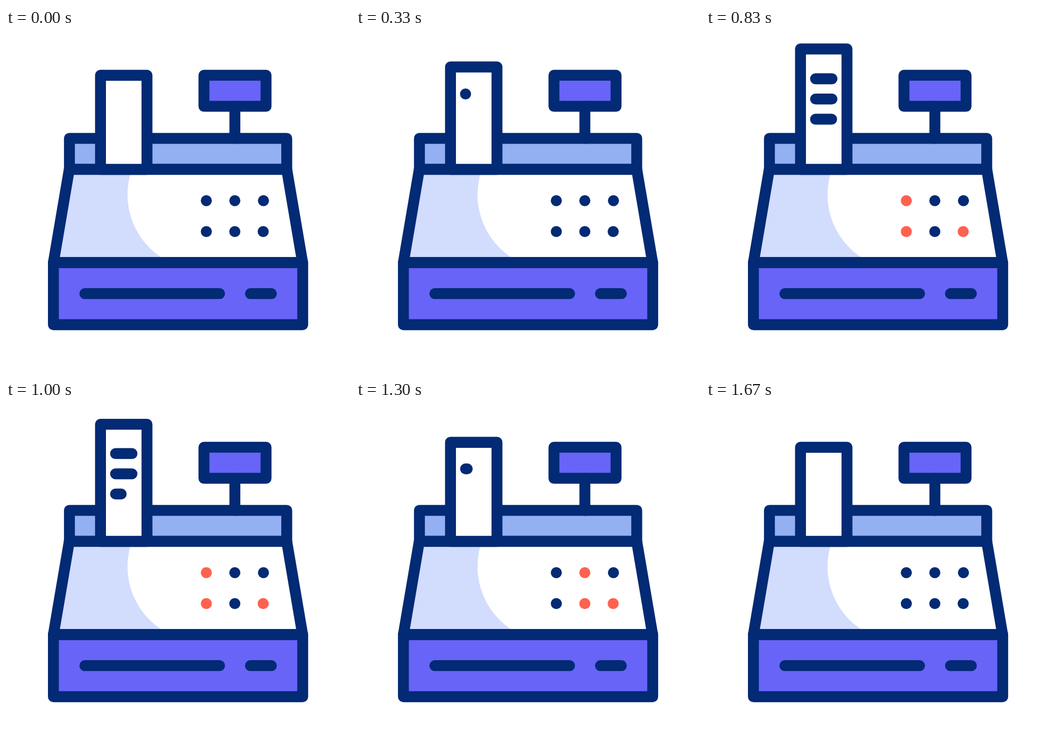
An HTML page with a canvas that plays this animation: 640x640 px, repeating every 2 s.

```html
<!DOCTYPE html>
<html lang="en">
<head>
<meta charset="utf-8">
<title>Cash register</title>
<style>
  html, body { margin: 0; width: 100%; height: 100%; overflow: hidden; background: #fff; }
  canvas { display: block; width: 100vw; height: 100vh; }
</style>
</head>
<body>
<canvas id="stage" width="640" height="640"></canvas>
<script>
const ctx = document.getElementById('stage').getContext('2d');
const LOOP = 2000, FPS = 30;
const NAVY = '#032a74', PURPLE = '#6864f8', SKY = '#93b0f3', PALE = '#d2dcfd', RED = '#ff6150';
const BODY = [[117.7, 263], [522.3, 263], [551.8, 436.5], [88.2, 436.5]];

// Button columns and rows, with the phase in which each lights up
const KEYS = [
  { x: 372.7, y: 321.2, lit: [1] },
  { x: 425.7, y: 321.2, lit: [2] },
  { x: 479, y: 321.2, lit: [] },
  { x: 372.7, y: 378.8, lit: [1] },
  { x: 425.7, y: 378.8, lit: [2] },
  { x: 478.5, y: 378.8, lit: [1, 2] }
];

// Printed lines: first frame of growing and of shrinking, full right end
const PRINTS = [
  { grow: 10, shrink: 35, right: 234.4 },
  { grow: 15, shrink: 31, right: 234.4 },
  { grow: 20, shrink: 27, right: 233.7 }
];
const PRINT_TIME = 5;

function ease(from, to, f) {
  const u = Math.min(1, Math.max(0, (f - from) / (to - from)));
  return u * u * (3 - 2 * u);
}

function polygon(points) {
  ctx.beginPath();
  points.forEach(([x, y]) => ctx.lineTo(x, y));
  ctx.closePath();
}

function box(x1, y1, x2, y2, fill) {
  polygon([[x1, y1], [x2, y1], [x2, y2], [x1, y2]]);
  ctx.fillStyle = fill;
  ctx.fill();
  ctx.stroke();
}

function line(x1, y1, x2, y2) {
  ctx.beginPath();
  ctx.moveTo(x1, y1);
  ctx.lineTo(x2, y2);
  ctx.stroke();
}

function disc(x, y, r, fill) {
  ctx.beginPath();
  ctx.arc(x, y, r, 0, Math.PI * 2);
  ctx.fillStyle = fill;
  ctx.fill();
}

function drawBody() {
  ctx.save();
  polygon(BODY);
  ctx.clip();
  ctx.fillStyle = PALE;
  ctx.fillRect(78, 253, 484, 194);
  disc(366, 310, 140, '#fff');
  ctx.fillRect(366, 253, 196, 194);
  ctx.restore();
  polygon(BODY);
  ctx.stroke();
}

function drawReceipt(f) {
  const out = ease(1, 25, f) - ease(26, 44, f);
  box(175.8, 88 - 49 * out, 262.3, 263, '#fff');
  PRINTS.forEach(({ grow, shrink, right }, i) => {
    if (f < grow || f >= shrink + PRINT_TIME) return;
    const size = ease(grow, grow + PRINT_TIME, f) - ease(shrink, shrink + PRINT_TIME, f);
    const y = 135.9 - 41.4 * out + 37.6 * i;
    const left = 203.8;
    if (size > 0) line(left, y, left + (right - left) * size, y);
    else disc(left, y, 10.3, NAVY);
  });
}

function drawKeys(f) {
  const phase = f < 17 ? 0 : f < 34 ? 1 : f < 50 ? 2 : 0;
  KEYS.forEach(k => disc(k.x, k.y, 10.3, k.lit.includes(phase) ? RED : NAVY));
}

function draw(f) {
  ctx.fillStyle = '#fff';
  ctx.fillRect(0, 0, 640, 640);
  ctx.strokeStyle = NAVY;
  ctx.lineWidth = 20.3;
  ctx.lineCap = ctx.lineJoin = 'round';

  box(118, 205.3, 522.3, 263, SKY);
  box(368.3, 87.9, 483.8, 145.7, PURPLE);
  line(425.8, 145.7, 425.8, 205.3);
  drawBody();
  box(88.2, 436.5, 552, 552, PURPLE);
  line(146.7, 494.2, 397.3, 494.2);
  line(454.8, 494.2, 493.7, 494.2);
  drawKeys(f);
  drawReceipt(f);
}

const start = performance.now();

function tick() {
  const t = (performance.now() - start) % LOOP;
  // Small lead keeps steps on the 10 ms grid
  draw(Math.min(59, Math.floor((t + 3.4) * FPS / 1000)));
  requestAnimationFrame(tick);
}
tick();
</script>
</body>
</html>
```
